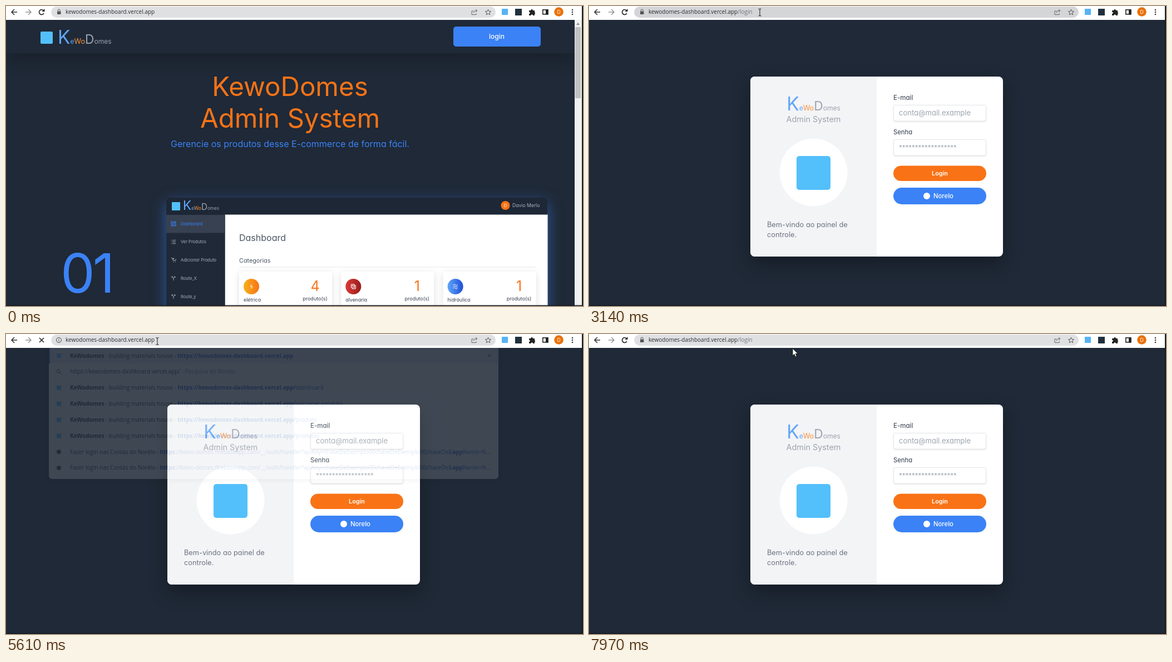
Animation, 1037 px wide and 540 px high, one loop 8000 ms. Source, as an HTML page:

```html
<!DOCTYPE html>
<html lang="pt">
<head>
<meta charset="utf-8">
<title>Admin System</title>
<style>
html, body { margin: 0; width: 100%; height: 100%; overflow: hidden; background: #1f2937; }
svg { display: block; width: 1037px; height: 540px; font-family: Inter, sans-serif; font-feature-settings: "cv11"; }
.ui { font-family: "Open Sans", sans-serif; font-feature-settings: normal; }
#url { font: 10px/21px "Open Sans", sans-serif; color: #2b2d30; white-space: pre; }
#url i { font-style: normal; color: #70757a; }
#url b { font-weight: 400; background: #8db7f2; padding: 2px 0; }
#url u { border-left: 1px solid #222; }
.line { fill: none; stroke-width: 1; }
.bold { stroke-width: 1.6; }
</style>
</head>
<body>
<svg id="stage" viewBox="0 0 1037 540"></svg>
<script>
const LOOP = 8000;
const BLUE = '#3b82f6', ORANGE = '#f97316', DARK = '#1f2937', GRAY = '#9ca3af', SKY = '#53c0fb';
const HOST = 'kewodomes-dashboard.vercel.app';
const MID = 'text-anchor="middle"';

const text = (x, y, str, size, fill, more = '') =>
  `<text x="${x}" y="${y}" font-size="${size}" fill="${fill}" ${more}>${str}</text>`;
const rect = (x, y, w, h, fill, more = '') =>
  `<rect x="${x}" y="${y}" width="${w}" height="${h}" fill="${fill}" ${more}/>`;
const circle = (x, y, r, fill, more = '') =>
  `<circle cx="${x}" cy="${y}" r="${r}" fill="${fill}" ${more}/>`;
const line = (x, y, d, color, weight = '', more = '') =>
  `<path class="line ${weight}" transform="translate(${x} ${y})" d="${d}" stroke="${color}" ${more}/>`;
const shadow = value => `style="filter:drop-shadow(${value})"`;
const group = (id, content, more = '') => `<g id="${id}" ${more}>${content}</g>`;

function brand(x, y, size, more = '') {
  const part = (str, scale, fill) => `<tspan font-size="${size * scale}" fill="${fill}">${str}</tspan>`;
  return `<text x="${x}" y="${y}" ${more}>` + part('K', 1, '#60a5fa') + part('e', .36, '#60a5fa') +
    part('Wo', .38, '#fb923c') + part('D', .68, GRAY) + part('omes', .36, GRAY) + '</text>';
}

function sidebar() {
  const icons = [
    'M-4-4h3v4h-3zM1-4h3v2h-3zM1 0h3v4h-3zM-4 2h3v2h-3z',
    'M-4-3h1M-2-3h6M-4 0h1M-2 0h6M-4 3h1M-2 3h6',
    'M-4-4h1.5l2 5h4l1-3M0-4v3M-1.5-2.5h3M-1 3.5h1M3 3.5h1',
    'M0 4v-4l-3-3v2M-3-3h2M0 0l3-3v2M3-3h-2'
  ];
  const items = ['Dashboard', 'Ver Produtos', 'Adicionar Produto', 'Route_X', 'Route_y'];
  return rect(288, 376, 105.5, 164, DARK) + rect(288, 376, 105.5, 32.5, '#374151') +
    items.map((item, i) => {
      const y = 392 + i * 32.7, color = i ? '#a9b0bb' : BLUE;
      return line(301, y, icons[Math.min(i, 3)], color) + text(314, y + 2.7, item, 7.5, color);
    }).join('');
}

function category(i, name, count, from, to, icon) {
  const x = 419 + i * 183.3;
  return `<linearGradient id="g${i}"><stop stop-color="${from}"/><stop offset="1" stop-color="${to}"/></linearGradient>` +
    rect(x, 478, 167, 80, '#fff', 'rx="4" ' + shadow('0 3px 6px rgba(0,0,0,.13)')) +
    circle(x + 22, 505, 14, `url(#g${i})`) + line(x + 22, 505, icon, '#fff') +
    text(x + 8, 532, name, 8.8, '#374151') +
    text(x + 136.5, 513, count, 25, ORANGE, MID) +
    text(x + 136.5, 530, 'produto(s)', 9, '#374151', MID);
}

const home = () => rect(0, 25, 1022, 515, DARK) +
  rect(0, 25, 1022, 60, DARK, shadow('0 14px 14px rgba(0,0,0,.2)')) +
  rect(62, 46, 22, 22, SKY, 'rx="2"') + brand(93, 68, 33.5) +
  rect(804, 37, 157, 36, BLUE, 'rx="5" id="enter"') +
  text(882, 59, 'login', 12, '#fff', MID + ' font-weight="500"') +
  text(510.5, 162, 'KewoDomes', 47.5, ORANGE, MID) +
  text(510.5, 219, 'Admin System', 47.5, ORANGE, MID) +
  text(510.5, 253.5, 'Gerencie os produtos desse E-commerce de forma fácil.', 16, BLUE, MID) +
  text(98, 516, '01', 98, BLUE, 'letter-spacing="-4"') +
  rect(288, 345, 685, 220, DARK, 'rx="8" ' + shadow('0 8px 13px rgba(59,130,246,.55)')) +
  rect(288, 345, 685, 40, '#1d2735', 'rx="8"') +
  rect(298, 353, 15, 15, SKY, 'rx="1"') + brand(318, 367, 22.5) +
  circle(897.5, 359, 8, ORANGE) + text(897.5, 362, 'D', 7.5, '#fff', MID) +
  text(910, 362, 'Davio Merlo', 8.6, '#a9b0bb') +
  rect(393.5, 375.5, 580, 164.5, '#fff') + sidebar() +
  text(419, 423, 'Dashboard', 16, '#4b5563') + text(419, 462, 'Categorias', 10.8, '#4b5563') +
  rect(419, 469.5, 534, 1, '#e5e7eb') +
  category(0, 'elétrica', 4, '#f5b01c', ORANGE, 'M1-4l-3 4h4l-2 4') +
  category(1, 'alvenaria', 1, '#dc3a34', '#961d1d', 'M-4-4h6v6h-6zM2-2h2v6h-6v-2M-4-1h6M-1-4v3') +
  category(2, 'hidráulica', 1, '#60a5fa', '#1d4ed8', 'M-4-3q2-2 4 0t4 0M-4 0q2-2 4 0t4 0M-4 3q2-2 4 0t4 0') +
  rect(1022, 25, 13, 515, '#f1f1f1') + rect(1023, 38, 10, 128, '#c1c1c1') +
  '<path d="M1025 34l3-4 3 4z" fill="#8a8a8a"/>';

const field = y => rect(547.5, y + .5, 166, 28.5, '#fff',
  'rx="3" stroke="#e5e7eb" ' + shadow('0 1px 1px rgba(0,0,0,.12)'));

const login = () => rect(0, 25, 1035, 515, DARK) +
  rect(290, 127, 454, 324, '#fff', 'rx="8" ' + shadow('0 14px 16px rgba(0,0,0,.3)')) +
  '<path d="M517 127h-219a8 8 0 0 0-8 8v308a8 8 0 0 0 8 8h219z" fill="#f3f4f6"/>' +
  brand(403.5, 188, 33.5, MID) + text(403.5, 209, 'Admin System', 14.4, GRAY, MID) +
  circle(403.5, 299.5, 61, '#fff') + rect(373, 270, 61, 61, SKY, 'rx="5"') +
  text(320, 398, 'Bem-vindo ao painel de', 12.8, '#6b7280') + text(320, 416, 'controle.', 12.8, '#6b7280') +
  text(547, 168.5, 'E-mail', 11.5, '#4b5563', 'font-weight="500"') + field(178) +
  text(557, 197, 'conta@mail.example', 13, GRAY) +
  text(547, 231, 'Senha', 11.2, '#4b5563', 'font-weight="500"') + field(240) +
  text(557, 259, '*'.repeat(18), 11.5, GRAY) +
  rect(547, 287.5, 167, 27.5, ORANGE, 'rx="13.7"') +
  text(630.5, 305, 'Login', 10.8, '#fff', MID + ' font-weight="600"') +
  rect(547, 327, 167, 30, BLUE, 'rx="15"') + circle(607, 342, 6, '#fff') +
  text(619, 346, 'Norelo', 11.3, '#fff', 'font-weight="500"');

function suggestions() {
  const link = (str, bold) => `<tspan fill="#1a56c4"${bold ? ' font-weight="700"' : ''}>${str}</tspan>`;
  const site = path => '<tspan font-weight="700">KeWodomes</tspan> - building materials house - ' +
    link('https://' + HOST + (path && '/'), true) + link(path);
  const auth = 'Fazer login nas Contas do Norelo - ' + link('https', true) +
    link('://kewo-domes.firebaseapp.com/__/auth/handler?apiKey=chaveDeExemplo00chaveDeExemplo00chaveDe&amp;') +
    link('app', true) + link('Name=%...');
  const rows = [site(''), `https://${HOST}/ <tspan fill="#70757a">- Pesquisa do Norelo</tspan>`,
    ...['dashboard', 'adicionar-produto', 'produto', 'produtos'].map(site), auth, auth];
  const mark = (i, y) => i === 1 ? line(95, y, 'M1.5 1.5l3 3M2-1a3 3 0 1 1-6 0a3 3 0 1 1 6 0', '#444') :
    i > 5 ? circle(95, y, 4, '#444') : rect(91, y - 4, 8, 8, SKY);
  return rect(77, 0, 808, 261, '#fff', 'rx="6" ' + shadow('0 3px 5px rgba(0,0,0,.3)')) +
    rect(77, 25, 808, 28, '#e8eaed') + rect(77, 25, 2, 28, '#1a73e8') +
    line(869, 39, 'M-3-3l6 6M3-3l-6 6', '#333') +
    rows.map((row, i) => mark(i, 39 + i * 28.85) + text(115, 42.5 + i * 28.85, row, 10, '#202124')).join('');
}

const toolbar = () => rect(0, 0, 1037, 25, '#fff') +
  group('joined', rect(77, 0, 808, 25, '#fff')) +
  rect(81, 1, 799, 20, '#dfe0e2', 'rx="10" id="pill" stroke-width="1.7"') +
  line(15, 11, 'M5 0h-10M0-5l-5 5 5 5', '#333', 'bold') +
  line(40, 11, 'M-5 0h10M0-5l5 5-5 5', '#9a9a9a', 'bold') +
  group('reload', line(64, 11, 'M4 2.2a4.5 4.5 0 1 1-.8-5.4', '#222', 'bold') +
    '<path d="M69.5 5v5h-5z" fill="#222"/>') +
  group('stop', line(64, 11, 'M-4-4l8 8M4-4l-8 8', '#222', 'bold')) +
  group('lock', rect(92, 9.5, 6.5, 5.5, '#555', 'rx=".8"') + line(95.2, 9.5, 'M-2 0v-1.5a2 2 0 0 1 4 0v1.5', '#555')) +
  group('info', line(95, 11, 'M4.5 0a4.5 4.5 0 1 1-9 0a4.5 4.5 0 1 1 9 0M0-.5v3M0-2.5v1', '#444')) +
  line(842, 11, 'M-2-2h-3v6.5h8v-2.5M-2 1.5q0-4 4-4h2M2-5l3 2.5-3 2.5', '#666') +
  line(866.5, 11, 'M0-5l1.5 3.5 3.5.3-2.7 2.3.9 3.6-3.2-2-3.2 2 .9-3.6-2.7-2.3 3.5-.3z', '#555') +
  rect(891, 5, 11, 11, '#56b3f5') + rect(915, 5, 12, 12, '#20303c') +
  '<path d="M940 8h3a2 2 0 0 1 4 0h3v3a2 2 0 0 1 0 3.5v2.5h-3a1.8 1.8 0 0 0-3.6 0h-3.4v-3a1.8 1.8 0 0 0 0-3.6z" fill="#222"/>' +
  rect(964.8, 6.8, 9, 8, '#fff', 'stroke="#222" stroke-width="1.6"') + rect(970, 6, 4.5, 9.5, '#222') +
  circle(993.5, 10.5, 8.3, '#e8710a') + text(993.5, 14, 'D', 9, '#fff', MID) +
  [7, 11, 15].map(y => circle(1018, y, 1.3, '#333')).join('') +
  '<foreignObject x="107" y="0" width="720" height="22"><div id="url"></div></foreignObject>';

const cursor = () =>
  '<path id="arrow" d="M0 0v13l3-2.7 2 4.7 2.2-1-2-4.5h4z" fill="#fff" stroke="#111" stroke-width=".8"/>' +
  line(0, 0, 'M-2.5-6.5q2.5 0 2.5 1.5q0-1.5 2.5-1.5M0-5v10M-2.5 6.5q2.5 0 2.5-1.5q0 1.5 2.5 1.5', '#111', '', 'id="beam"');

document.getElementById('stage').innerHTML =
  rect(0, 0, 1037, 540, DARK) + group('home', home()) + group('login', login()) +
  group('list', suggestions(), 'class="ui"') + group('bar', toolbar(), 'class="ui"') +
  rect(0, 538.5, 1037, 1.5, '#151a22') + rect(1035, 0, 2, 540, '#14181f') +
  group('cursor', cursor());

const el = Object.fromEntries([...document.querySelectorAll('[id]')].map(node => [node.id, node]));
const show = (node, on) => node.style.display = on ? '' : 'none';

// Page and address over time: [start, page, address]
const scenes = [
  [0, 'home', 'root'], [1450, 'login', 'path'], [3660, 'login', 'all'], [4670, 'login', 'caret'],
  [4730, 'login', 'word'], [5290, 'login', 'typed'], [5560, 'login', 'load'],
  [5950, 'blank', 'load'], [6010, 'home', 'root'], [7070, 'login', 'path']
];
const addresses = {
  root: HOST, load: HOST, path: HOST + '<i>/login</i>',
  all: `<b>https://${HOST}/login</b>`,
  caret: `<i>https://</i>${HOST}<i>/login</i><u></u>`,
  word: `<i>https://</i>${HOST}<i>/</i><b>login</b>`,
  typed: `<i>https://</i>${HOST}<i>/</i><u></u>`
};
// Pointer moves: [first step, last step, steps, x, y]
const origin = [1018, 545];
const moves = [
  [240, 1020, 13, 867, 89], [1090, 1270, 4, 882, 53], [1650, 2020, 7, 760, 116],
  [2280, 3020, 13, 299, 9], [3090, 3140, 2, 307, 11.5], [3340, 3340, 1, 308, 11.5],
  [3660, 4110, 7, 279, 12], [4310, 4430, 3, 272, 13],
  [6370, 6650, 5, 987, 104], [6700, 7010, 5, 936, 58], [7200, 7970, 13, 366, 26]
];

function pointer(time) {
  let [x, y] = origin;
  for (const [start, end, steps, toX, toY] of moves) {
    if (time < start) break;
    const gap = (end - start) / (steps - 1 || 1) || 1;
    const done = Math.min(steps, Math.floor((time - start) / gap + 1.001)) / steps;
    const eased = .5 * done + .5 * done * done * (3 - 2 * done);
    x += (toX - x) * eased;
    y += (toY - y) * eased;
  }
  return [x, y];
}

let lastAddress;
function draw(time) {
  const [, page, address] = scenes.findLast(scene => time >= scene[0]);
  const [x, y] = pointer(time);
  const focused = ['all', 'caret', 'word', 'typed'].includes(address);
  const typing = address === 'typed';
  const loading = address === 'load';
  const beam = time >= 3090 && time < 6370;
  const overBar = time >= 2960 && time < 3660;
  const overEnter = x > 804 && x < 961 && y > 37 && y < 73;

  show(el.home, page === 'home');
  show(el.login, page === 'login');
  show(el.list, time >= 5290 && time < 5950);
  el.list.setAttribute('opacity', time < 5560 ? 1 : time < 5610 ? .55 : .14);

  if (address !== lastAddress) el.url.innerHTML = addresses[lastAddress = address];
  show(el.joined, typing);
  el.pill.setAttribute('fill', focused ? '#fff' : overBar ? '#d4d5d7' : '#dfe0e2');
  el.pill.setAttribute('stroke', focused && !typing ? '#1a66d0' : 'none');
  show(el.reload, !loading);
  show(el.stop, loading);
  show(el.lock, !loading);
  show(el.info, loading);

  el.enter.setAttribute('fill', overEnter ? '#2563eb' : BLUE);
  show(el.cursor, time >= 240);
  el.cursor.setAttribute('transform', `translate(${x} ${y})`);
  show(el.arrow, !beam);
  show(el.beam, beam);
}

const began = performance.now();
function tick() {
  draw((performance.now() - began) % LOOP);
  requestAnimationFrame(tick);
}
tick();
</script>
</body>
</html>
```
